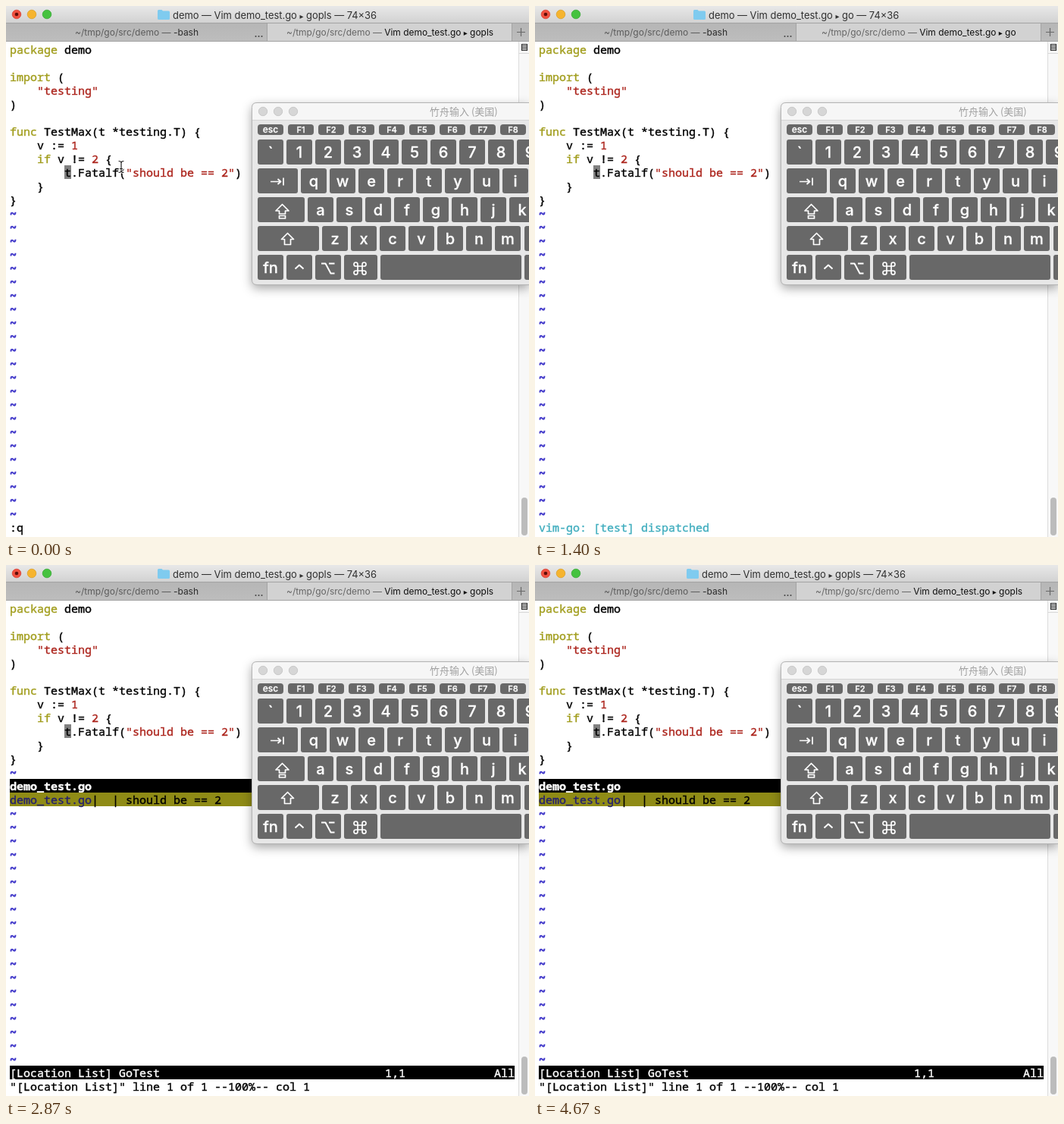
These frames come from a looping animation (690x700 px, 4.74 s). An HTML page:

```html
<!DOCTYPE html>
<html lang="zh-CN">
<head>
<meta charset="utf-8">
<title>Vim test run</title>
<style>
  html, body { margin: 0; width: 100%; height: 100%; overflow: hidden; background: #fff; }
  svg { display: block; }
  text { white-space: pre; }
  .mono { font: 500 15px "Noto Sans Mono", "Liberation Mono", monospace; stroke-width: .4; }
  .bold { font-weight: 700; }
  #filler { stroke-width: .9; }
  #filler .mono { stroke-width: inherit; }
  .ui { font-family: Inter, Roboto, sans-serif; }
  .arrow { font-family: "DejaVu Sans", sans-serif; font-size: 10px; }
  .key { font: 500 20px Inter, Roboto, sans-serif; fill: #fff; stroke: #fff; stroke-width: .3; text-anchor: middle; }
  .cjk { font: 13px "Noto Sans CJK SC", "Noto Sans CJK", sans-serif; }
  #panel { filter: drop-shadow(0 5px 7px rgba(0, 0, 0, .36)); }
</style>
</head>
<body>
<svg id="stage" width="690" height="700" viewBox="0 0 690 700">
  <defs>
    <linearGradient id="bar" x2="0" y2="1">
      <stop stop-color="#e8e8e8"/><stop offset="1" stop-color="#d1d1d1"/>
    </linearGradient>
    <linearGradient id="tab" x2="0" y2="1">
      <stop stop-color="#b6b6b6"/><stop offset="1" stop-color="#bdbdbd"/>
    </linearGradient>
    <path id="beam" d="M-3 -7.5Q0 -7.5 0 -5Q0 -7.5 3 -7.5M0 -5V5M-3 7.5Q0 7.5 0 5Q0 7.5 3 7.5M-1.5 2.5H1.5"/>
  </defs>
  <rect width="690" height="700" fill="#fff"/>

  <g id="scrollbar">
    <rect x="676" y="47" width="14" height="653" fill="#f8f8f8"/>
    <path d="M676.5 47V700" stroke="#dcdcdc"/>
    <path d="M676 62.5H690" stroke="#d8d8d8"/>
    <rect x="680.5" y="50.5" width="7" height="8" fill="#fff" stroke="#222"/>
    <path d="M681 52.5h6m-6 2h6m-6 2h6" stroke="#333"/>
    <rect x="680" y="648" width="8" height="50" rx="4" fill="#bcbcbc"/>
  </g>

  <g id="code"></g>
  <g id="filler"></g>
  <g id="list"></g>
  <g id="status"></g>

  <g id="chrome" class="ui">
    <rect width="690" height="23" fill="url(#bar)"/>
    <rect y="23" width="690" height="24" fill="url(#tab)"/>
    <rect x="345" y="23" width="322" height="24" fill="#d2d2d2"/>
    <path d="M0 22.5H690M0 46.5H690M344.5 23V46M667.5 23V46" stroke="#a3a3a3"/>
    <g stroke-width=".7">
      <circle cx="14" cy="11" r="5.8" fill="#f0503f" stroke="#d63e32"/>
      <circle cx="34" cy="11" r="5.8" fill="#f6b42f" stroke="#d99b23"/>
      <circle cx="54" cy="11" r="5.8" fill="#45c23f" stroke="#32a42f"/>
    </g>
    <circle cx="14" cy="11" r="2.3" fill="#600d08"/>
    <path d="M674 34.5h11m-5.5 -5.5v11" stroke="#686868" stroke-width="1.2"/>
    <g fill="#444">
      <circle cx="329.5" cy="40" r="1"/><circle cx="333.5" cy="40" r="1"/><circle cx="337.5" cy="40" r="1"/>
    </g>
    <text x="91" y="39" font-size="12" fill="#5c5c5c">~/tmp/go/src/demo — <tspan fill="#2c2c2c">-bash</tspan></text>
  </g>
  <g id="titles" class="ui"></g>

  <path id="panel" d="M690 127H331Q324.5 127 324.5 133.5V361Q324.5 367 331 367H690Z" fill="#e7e7e7"/>
  <path d="M690 127.5H331Q324.5 127.5 324.5 133.5V150H690Z" fill="#f6f6f6"/>
  <path d="M325 150.5H690" stroke="#d5d5d5"/>
  <path d="M690 127.5H331Q324.5 127.5 324.5 133.5V361Q324.5 367.5 331 367.5H690" fill="none" stroke="#b4b4b4"/>
  <g fill="#d6d6d6" stroke="#c2c2c2" stroke-width=".8">
    <circle cx="339" cy="139" r="5.7"/><circle cx="359" cy="139" r="5.7"/><circle cx="379" cy="139" r="5.7"/>
  </g>
  <text class="cjk" x="559" y="144" fill="#a0a0a0">竹舟输入 (美国)</text>
  <g id="keys"></g>
  <g fill="none" stroke="#fff" stroke-width="1.7" stroke-linejoin="round">
    <path d="M349 231.5H362M358.5 228L362.5 231.5L358.5 235M366 226.5V236.5"/>
    <path d="M364.5 261.5L373 270H368.5V274H360.5V270H356ZM360.5 276.5H368.5V280H360.5Z"/>
    <path d="M371.5 299.5L379.5 307.5H375.5V314.5H367.5V307.5H363.5Z"/>
    <path d="M381.5 346.5L387 341.5L392.5 346.5" stroke-width="2"/>
    <path d="M416 339.5H421.5L428.5 352.5H433.5M426 339.5H433.5" stroke-width="2"/>
    <path d="M464 343h6v6h-6zM464 343h-2.5a2.5 2.5 0 1 1 2.5 -2.5zM470 343v-2.5a2.5 2.5 0 1 1 2.5 2.5zM470 349h2.5a2.5 2.5 0 1 1 -2.5 2.5zM464 349v2.5a2.5 2.5 0 1 1 -2.5 -2.5z"/>
  </g>

  <g id="pointer" fill="none" stroke-linecap="round">
    <use href="#beam" stroke="#fff" stroke-width="3"/>
    <use href="#beam" stroke="#222" stroke-width="1.2"/>
  </g>
</svg>

<script>
const LOOP = 4740;
const INK = '#000', KEYWORD = '#a19d1c', RED = '#ad261e', BLUE = '#3f36c9', CYAN = '#42aebf';
const $ = id => document.getElementById(id);

function add(parent, tag, attrs, content = '') {
  const el = document.createElementNS('http://www.w3.org/2000/svg', tag);
  for (const name in attrs) el.setAttribute(name, attrs[name]);
  el.textContent = content;
  return parent.appendChild(el);
}

// Terminal grid: 74 columns of 9 px, rows of 18 px.
const colX = col => 5 + col * 9;
const rowY = row => 48 + row * 18;
const put = (parent, row, col, str, fill = INK, bold = false) =>
  add(parent, 'text', {
    class: bold ? 'mono bold' : 'mono', x: colX(col), y: rowY(row) + 15, fill, stroke: fill
  }, str);
const band = (parent, row, fill, col = 0, cols = 74) =>
  add(parent, 'rect', { x: colX(col), y: rowY(row), width: cols * 9, height: 18, fill });

const code = $('code');
const cursor = band(code, 9, '#808080', 8, 1);
[
  [0, 0, 'package', KEYWORD], [0, 8, 'demo'],
  [2, 0, 'import', KEYWORD], [2, 7, '('],
  [3, 4, '"testing"', RED],
  [4, 0, ')'],
  [6, 0, 'func', KEYWORD], [6, 5, 'TestMax(t *testing.T) {'],
  [7, 4, 'v := '], [7, 9, '1', RED],
  [8, 4, 'if', KEYWORD], [8, 7, 'v != '], [8, 12, '2', RED], [8, 14, '{'],
  [9, 8, 't.Fatalf('], [9, 17, '"should be == 2"', RED], [9, 33, ')'],
  [10, 4, '}'], [11, 0, '}']
].forEach(args => put(code, ...args));

for (let row = 12; row < 35; row++) put($('filler'), row, 0, '~', BLUE, true);

// The list window covers the filler rows beneath it.
const list = $('list');
band(list, 13, '#000');
put(list, 13, 0, 'demo_test.go', '#fff', true);
band(list, 14, '#8f8b16');
put(list, 14, 0, 'demo_test.go', '#25216f');
put(list, 14, 12, '|  | should be == 2');
band(list, 34, '#000');
put(list, 34, 0, '[Location List] GoTest', '#fff');
put(list, 34, 55, '1,1', '#fff');
put(list, 34, 71, 'All', '#fff');

// Keyboard
const keys = $('keys');
function key(x, y, w, label = '', h = 33, size = 20) {
  add(keys, 'rect', { x, y, width: w, height: h, rx: h > 20 ? 3 : 4, fill: '#686868' });
  if (label) add(keys, 'text', {
    class: 'key', x: x + w / 2, y: y + h / 2 + size * .36, style: `font-size:${size}px`
  }, label);
}
const run = (x, y, labels) => [...labels].forEach((c, i) => key(x + i * 38, y, 34, c));

key(332, 156, 34, 'esc', 14, 12);
for (let i = 1; i < 9; i++) key(332 + i * 40, 156, 34, 'F' + i, 14, 11);
run(332, 176, '`123456789');
key(332, 214, 53);
run(389, 214, 'qwertyui');
key(332, 252, 62);
run(398, 252, 'asdfghjk');
key(332, 290, 81);
run(417, 290, 'zxcvbnm');
key(684, 290, 34);
key(332, 328, 34, 'fn');
key(370, 328, 34);
key(408, 328, 34);
key(446, 328, 44);
key(494, 328, 186);
key(684, 328, 34);

// Window titles: job text, title x, tab text x
const FILE = 'Vim demo_test.go';
const TITLES = {
  gopls: [FILE + ' ▸ gopls', 220, 370],
  start: ['go ◂ ' + FILE, 229, 378],
  go: [FILE + ' ▸ go', 229, 378],
  link: [FILE + ' ▸ link', 226, 375]
};
const FOLDER = 'M0 6.5Q0 5 1.5 5H5.5L7 6.5H14.5Q16 6.5 16 8V16.5Q16 18 14.5 18H1.5Q0 18 0 16.5Z';
function spans(el, str, fill) {
  str.split(/([▸◂])/).forEach(part =>
    add(el, 'tspan', /[▸◂]/.test(part) ? { class: 'arrow', fill } : { fill }, part));
}
const titles = {};
for (const name in TITLES) {
  const [job, x, tabX] = TITLES[name];
  const g = titles[name] = add($('titles'), 'g', {});
  add(g, 'path', { d: FOLDER, fill: '#7fcbef', transform: `translate(${x - 20})` });
  spans(add(g, 'text', { x, y: 16.5, 'font-size': 12.9 }), `demo — ${job} — 74×36`, '#303030');
  const tab = add(g, 'text', { x: tabX, y: 39, 'font-size': 11.95 });
  spans(tab, '~/tmp/go/src/demo — ', '#666');
  spans(tab, job, '#111');
}

// Steps: time, title, command line, its colour, cursor shown, list open
const STEPS = [
  [0, 'gopls', ':q', INK, true, false],
  [730, 'start', ':GoTestFunc', INK, false, false],
  [1130, 'go', 'vim-go: [test] dispatched', CYAN, true, false],
  [1930, 'link', 'vim-go: [test] dispatched', CYAN, true, false],
  [2800, 'gopls', '"[Location List]" line 1 of 1 --100%-- col 1', INK, true, true]
];
const status = put($('status'), 35, 0, '');
const show = (el, on) => { el.style.display = on ? '' : 'none'; };

// Mouse path: time, x, y
const PATH = [[3800, 455, 708], [3930, 471, 572], [4330, 471, 572], [4470, 530, 710]];
function mouseAt(t) {
  if (t < 730) return [152, 212];
  const i = PATH.findIndex(p => t < p[0]);
  if (i < 1) return null;
  const [t0, x0, y0] = PATH[i - 1], [t1, x1, y1] = PATH[i];
  const k = (t - t0) / (t1 - t0);
  return [x0 + (x1 - x0) * k, y0 + (y1 - y0) * k];
}

let current;
function apply(step) {
  const [, title, line, fill, hasCursor, open] = step;
  for (const name in titles) show(titles[name], name === title);
  status.textContent = line;
  status.setAttribute('fill', fill);
  status.setAttribute('stroke', fill);
  show(cursor, hasCursor);
  show(list, open);
  current = step;
}

function draw() {
  const t = performance.now() % LOOP;
  const step = STEPS.filter(s => s[0] <= t).pop();
  if (step !== current) apply(step);
  const pos = mouseAt(t);
  show($('pointer'), pos);
  if (pos) $('pointer').setAttribute('transform', `translate(${pos})`);
  requestAnimationFrame(draw);
}
draw();
</script>
</body>
</html>
```
